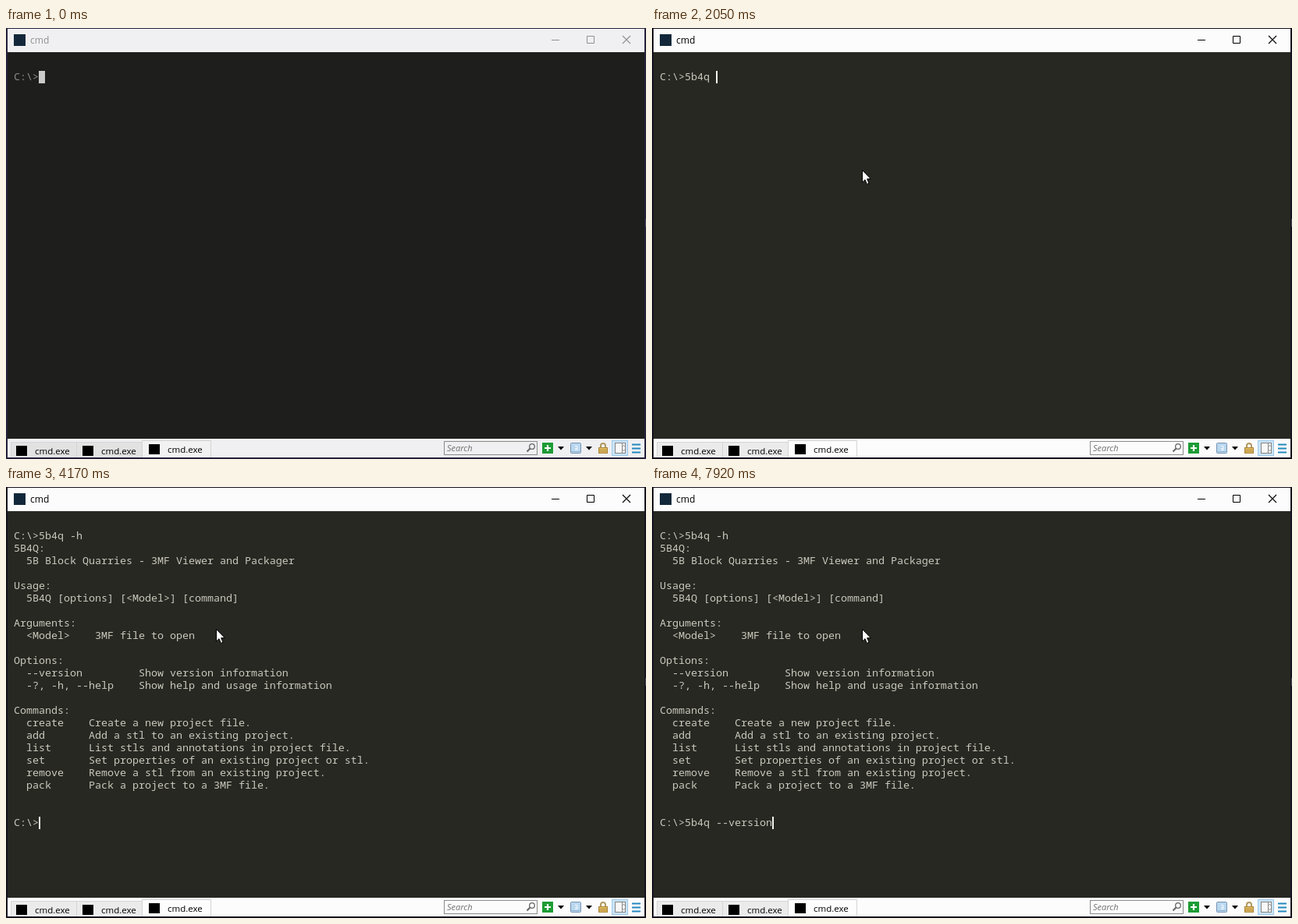
Recreate the animation shown at these times as an HTML page. Size 820 by 553 pixels, loop 8 s.

```html
<!DOCTYPE html>
<html lang="en">
<head>
<meta charset="utf-8">
<title>Console</title>
<style>
  html, body { margin: 0; width: 100%; height: 100%; overflow: hidden; background: #14121f; }
  svg { display: block; width: 820px; height: 553px;
    --bar: #fcfcfc; --term: #272822; --ink: #000; --tab: #ebebeb; --front: #fdfdfd;
    --fg: #cac9bd; --edge: #14121f; }
  svg.idle {
    --bar: #f0f0f2; --term: #1e1e1c; --ink: #909090; --tab: #e2e2e2; --front: #f2f2f2;
    --fg: #8d8d87; --edge: #24213a; }
  text { white-space: pre; font-family: "Open Sans", "Noto Sans", sans-serif; }
  #rows text { font: 13.3333px "Noto Sans Mono", "DejaVu Sans Mono", monospace;
    font-variant-ligatures: none; fill: var(--fg); }
  .tab { font-size: 11.5px; fill: #000; }
  #title { font-size: 12px; fill: var(--ink); }
  .bar { fill: var(--bar); }
  .ctl { fill: none; stroke: var(--ink); }
</style>
</head>
<body>
<svg id="win" class="idle" viewBox="0 0 820 553" xmlns="http://www.w3.org/2000/svg">
  <rect width="820" height="553" fill="var(--edge)"/>
  <rect x="819" y="245" width="1" height="10" fill="#4a4a55"/>
  <rect class="bar" x="2" y="1" width="816" height="30"/>
  <rect x="2" y="31" width="816" height="496" fill="var(--term)"/>
  <rect class="bar" x="2" y="527" width="816" height="24"/>

  <!-- title bar -->
  <rect x="10" y="8" width="15" height="15" fill="#12283a"/>
  <text id="title" x="31" y="20">cmd</text>
  <g class="ctl">
    <path d="M699 15.5H709M744.5 10.5h9v9h-9z"/>
    <path d="M790 10l10 10M800 10l-10 10" stroke-width="1.1"/>
  </g>

  <!-- tabs -->
  <g stroke="#d4d4d4" fill="var(--tab)">
    <path d="M6.5 551V531.5H90.5V551"/>
    <path d="M90.5 551V531.5H174.5V551"/>
    <path id="front" fill="var(--front)"/>
  </g>
  <rect x="13" y="536" width="14" height="13"/>
  <rect x="98" y="536" width="14" height="13"/>
  <rect x="183" y="534" width="14" height="13"/>
  <text class="tab" x="37" y="547">cmd.exe</text>
  <text class="tab" x="122" y="547">cmd.exe</text>
  <text class="tab" id="task" x="207" y="545">cmd.exe</text>

  <!-- search box -->
  <rect class="bar" x="561.5" y="530.5" width="119" height="17" stroke="#8b8b8b"/>
  <text x="565" y="543" font-size="11" font-style="italic" fill="#707070">Search</text>
  <g fill="none" stroke="#666">
    <circle cx="674" cy="537" r="3.3" stroke-width="1.3"/>
    <path d="M671.5 539.5L667.5 543.5" stroke-width="2"/>
  </g>

  <!-- toolbar -->
  <rect x="687" y="532" width="14" height="14" fill="#1c9c35"/>
  <path d="M690 539h8M694 535v8" stroke="#fff" stroke-width="2.2"/>
  <path d="M707 537h8l-4 4.5zM743 537h8l-4 4.5z"/>
  <rect x="723.5" y="532.5" width="13" height="13" rx="1" fill="#b9d7ee" stroke="#7794b3"/>
  <path d="M724 543.5h12" stroke="#93b4d2"/>
  <path d="M729 536.5h3v5M729 539.5h3M729 541.5h3" fill="none" stroke="#f4f9fd"/>
  <path d="M762 539v-3a3 3 0 0 1 6 0v3" fill="none" stroke="#b19a60" stroke-width="2"/>
  <rect x="759.5" y="538.5" width="11" height="7" fill="#dfb95d" stroke="#a8843a"/>
  <path d="M760 541.5h10M760 543.5h10" stroke="#b8934a"/>
  <rect x="776.5" y="529.5" width="20" height="19" fill="#cce4f6" stroke="#9ccbed"/>
  <rect x="780.5" y="532.5" width="13" height="13" fill="#f7f7f7" stroke="#858585"/>
  <path d="M789.5 533v12" stroke="#858585"/>
  <path d="M790.5 536.5l1-1 1 1M790.5 541.5l1 1 1-1" fill="none" stroke="#555"/>
  <path d="M802 534.5h11M802 539.5h11M802 544.5h11" stroke="#2488bd" stroke-width="2"/>

  <g id="rows"></g>
  <rect id="caret" height="16"/>
  <path id="mouse" d="M.5 .5V16L4 12.7 6.4 18.4 9 17.3 6.6 11.7H11.3Z" fill="#fff" stroke="#000"/>
</svg>
<script>
const LOOP = 8000, ACTIVE = 570;
const PROMPT = "C:\\>";
const HELP = `5B4Q:
  5B Block Quarries - 3MF Viewer and Packager

Usage:
  5B4Q [options] [<Model>] [command]

Arguments:
  <Model>    3MF file to open

Options:
  --version         Show version information
  -?, -h, --help    Show help and usage information

Commands:
  create    Create a new project file.
  add       Add a stl to an existing project.
  list      List stls and annotations in project file.
  set       Set properties of an existing project or stl.
  remove    Remove a stl from an existing project.
  pack      Pack a project to a 3MF file.`.split("\n");

// keystroke times
const FIRST = { text: "5b4q -h", keys: [1590, 1720, 1870, 1960, 2050, 2940, 3020] };
const SECOND = { text: "5b4q --version", keys: [5520, 5620, 5850, 5930, 6160, 6850, 7050,
  7150, 7260, 7360, 7510, 7600, 7690, 7920] };

// [time, value] steps
const PRINTED = [[0, 0], [3630, 2], [3670, 8], [3710, 12], [3760, 20]];
const BLINK = [[0, 1], [1080, 0], [1590, 1], [2610, 0], [2940, 1], [4270, 0], [4780, 1],
  [5340, 0], [5520, 1], [6670, 0], [6900, 1]];
const TITLE = [[0, "cmd"], [3430, "cmd - 5b4q  -h"], [3760, "cmd"]];
const TASK = [[0, "cmd.exe"], [3630, "5B4Q.exe"], [4170, "cmd.exe"]];

const $ = id => document.getElementById(id);
const at = (steps, t) => steps.filter(s => s[0] <= t).pop()[1];
const typed = (cmd, t) => cmd.text.slice(0, cmd.keys.filter(k => k <= t).length);
const set = (el, attrs) => { for (const k in attrs) el.setAttribute(k, attrs[k]); };
const say = (el, s) => { if (el.textContent !== s) el.textContent = s; };

const rows = Array.from({ length: 25 }, (_, r) => {
  const el = document.createElementNS("http://www.w3.org/2000/svg", "text");
  set(el, { x: 10, y: 51 + 16 * r });
  return $("rows").appendChild(el);
});

function caretCell(t, first, second) {
  if (t < 3400) return [PROMPT.length + first.length, 1];
  if (t < 3630) return [0, 2];
  if (t < 3670) return [0, 4];
  if (t < 3710) return [0, 10];
  if (t < 3760) return [2, 12];
  return [PROMPT.length + second.length, 24];
}

function draw(t) {
  const idle = t < ACTIVE;
  $("win").setAttribute("class", idle ? "idle" : "");
  say($("title"), at(TITLE, t));

  const task = at(TASK, t);
  say($("task"), task);
  set($("front"), { d: `M174.5 551V529.5H${task[0] === "c" ? 262.5 : 265.5}V551` });

  const first = typed(FIRST, t), second = typed(SECOND, t), count = at(PRINTED, t);
  say(rows[1], PROMPT + first);
  HELP.forEach((line, i) => {
    let s = i < count ? line : "";
    if (i === 11 && count === 12) s = line.slice(0, 16);
    say(rows[i + 2], s);
  });
  say(rows[24], t >= 3760 ? PROMPT + second : "");

  const [col, row] = caretCell(t, first, second);
  set($("caret"), {
    x: 10 + 8 * col, y: 39 + 16 * row, width: idle ? 8 : 2,
    fill: idle ? "#cbcbcb" : "#f4f4ee", opacity: at(BLINK, t)
  });

  // pointer glides in from the lower right in 13 positions
  const p = Math.min(12, Math.floor((t - 110) / 57.5)) / 12;
  const rest = (1 - p) ** 2;
  set($("mouse"), {
    visibility: t < 110 ? "hidden" : "visible",
    transform: `translate(${Math.round(269 + 370 * rest)} ${Math.round(182 + 358 * rest)})`
  });
}

const start = performance.now();
function tick() {
  draw((performance.now() - start) % LOOP);
  requestAnimationFrame(tick);
}
tick();
</script>
</body>
</html>
```
